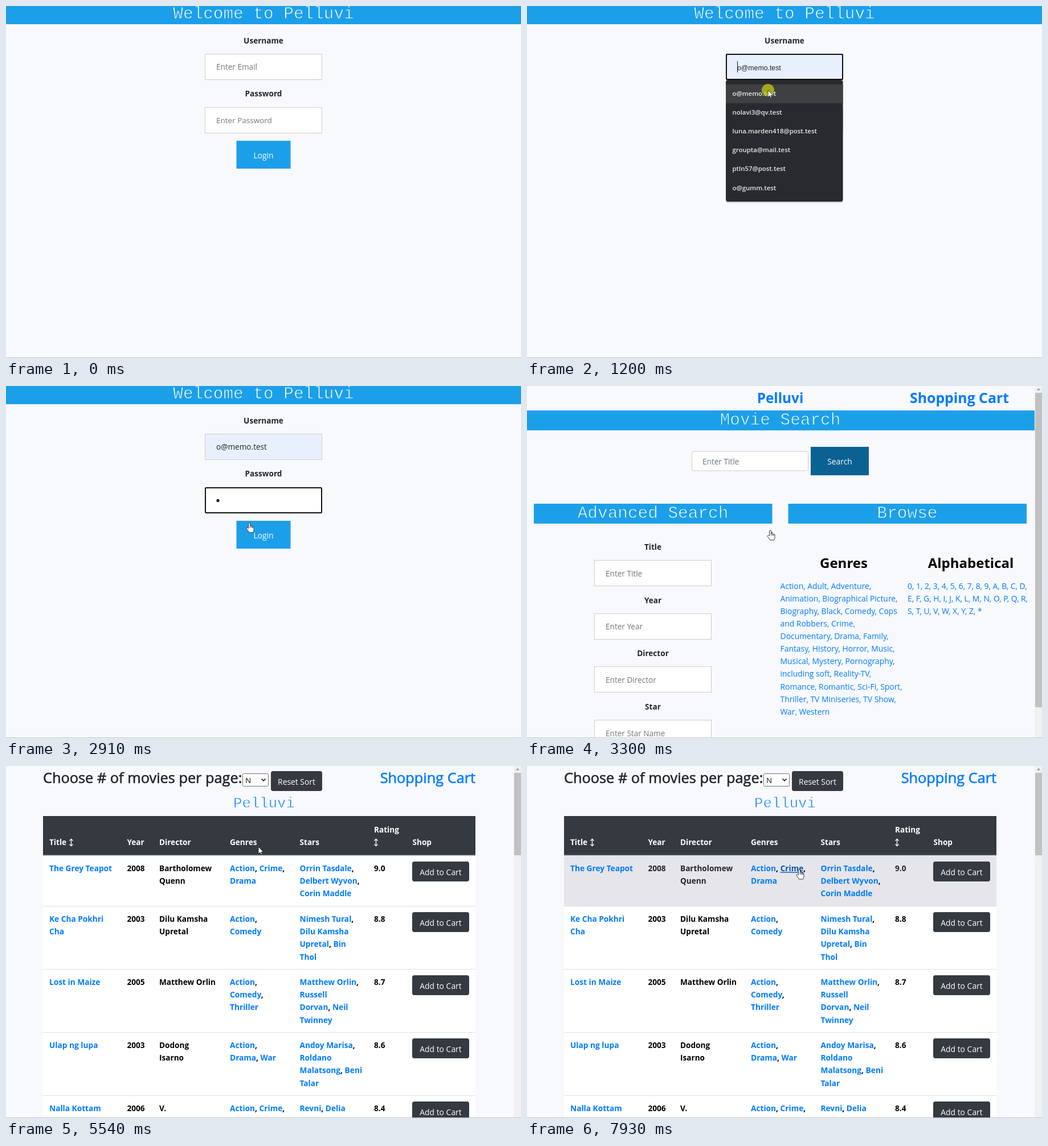
Animation of 904x619 px, one loop 8000 ms. Source, as an HTML page:

```html
<!DOCTYPE html>
<html lang="en">
<head>
<meta charset="utf-8">
<title>Movie shop walkthrough</title>
<style>
html, body { margin: 0; width: 100%; height: 100%; overflow: hidden; background: #f8f9fd; }
svg { display: block; width: 904px; height: 619px; font-family: "Open Sans", "Noto Sans", sans-serif; }
text { white-space: pre; }
.mono { font-family: "Liberation Mono", monospace; }
.arial { font-family: "Liberation Sans", sans-serif; }
.hover { fill: #0056b3; text-decoration: underline; }
</style>
</head>
<body>
<svg id="stage" viewBox="0 0 904 619"></svg>
<script>
const LOOP = 8000;
const BG = '#f8f9fd', BLUE = '#1c9fe9', LINK = '#007bff', DARK = '#343a40', INK = '#212529', HINT = '#757575';
const BRAND = 'Pelluvi', EMAIL = 'o@memo.test';

const attrs = o => Object.entries(o).map(([k, v]) => ` ${k}="${v}"`).join('');
const rect = (x, y, width, height, fill, more = {}) => `<rect${attrs({ x, y, width, height, fill, ...more })}/>`;
const text = (x, y, s, size = 13.8, fill = INK, more = {}) =>
  `<text${attrs({ x, y, 'font-size': size, fill, ...more })}>${s}</text>`;
const group = (id, ...parts) => `<g id="${id}">${parts.join('')}</g>`;
const mid = { 'text-anchor': 'middle' };
const bold = { 'font-weight': 700 };
const boldMid = { ...mid, ...bold };

// Medium weight: regular letters with a fine outline in their own colour.
const medium = (x, y, s, fill, more = {}) =>
  text(x, y, s, 25.3, fill, { stroke: fill, 'stroke-width': .6, ...more });
// Thin typewriter lettering: the outline eats into the fill.
const mono = (x, y, s, size, fill, back) =>
  text(x, y, s, size, fill, { ...mid, class: 'mono', stroke: back, 'stroke-width': size * .03 });
const bar = (x, y, w, h, s, cx, base) => rect(x, y, w, h, BLUE) + mono(cx, base, s, 29.4, '#fff', BLUE);
const box = (x, y, w, h, r = 0) =>
  rect(x + .5, y + .5, w - 1, h - 1, '#fff', { stroke: '#ccc', rx: r });
const focusBox = (id, y, h, fill) =>
  rect(350, y + 1, 204, h - 2, fill, { id, stroke: '#101010', 'stroke-width': 2, rx: 2 });
const button = (x, y, w, h, s, fill, r = 0) =>
  rect(x, y, w, h, fill, { rx: r }) + text(x + w / 2, y + h / 2 + 6, s, 13.9, '#fff', mid);
const lines = (x, y, list, fn) => list.map((s, i) => fn(x, y + i * 22.07, s)).join('');
const scrollbar = end => rect(891, 0, 13, 618, '#f1f1f1') + rect(892, 12, 12, end - 12, '#c1c1c1') +
  '<path d="M894.5 7.5h7l-3.5-4z" fill="#a3a3a3"/>';

function loginPage() {
  const mails = [EMAIL, 'nolavi3@qv.test', 'luna.marden418@post.test', 'groupta@mail.test', 'ptln57@post.test', 'o@gumm.test'];
  return group('login',
    bar(0, 0, 904, 32, 'Welcome to ' + BRAND, 452, 22),
    text(452, 66, 'Username', 13.6, INK, boldMid),
    box(349, 84, 206, 46),
    focusBox('userFocus', 84, 46, '#fff'),
    rect(350, 85, 204, 44, '#e8f0fe', { id: 'userFill' }),
    rect(350, 85, 204, 44, 'none', { id: 'userRing', stroke: '#101010', 'stroke-width': 2, rx: 2 }),
    text(369, 112, 'Enter Email', 13.6, HINT, { id: 'userHint' }),
    text(369, 112.5, EMAIL, 12.3, '#222', { id: 'preview', class: 'arial' }),
    text(369, 112, EMAIL, 13.6, INK, { id: 'userText' }),
    text(452, 159, 'Password', 13.6, INK, boldMid),
    box(349, 178, 206, 46),
    focusBox('passFocus', 178, 46, '#fff'),
    text(369, 206, 'Enter Password', 13.5, HINT, { id: 'passHint' }),
    '<circle id="dot" cx="372" cy="201.5" r="2.7" fill="#212529"/>',
    rect(369, 0, 1, 20, '#111', { id: 'caret' }),
    button(404.5, 237, 95, 49, 'Login', BLUE),
    group('menu',
      rect(349, 131, 206, 215, '#000', { rx: 4, opacity: .18 }),
      rect(349, 130, 205.5, 214, '#292a2d', { rx: 4 }),
      rect(349, 138, 205.5, 33, '#3f4042', { id: 'menuHover' }),
      ...mails.map((s, i) => text(360.5, 158 + i * 33.1, s, 11.4, '#e8eaed', { 'font-weight': 600 }))));
}

function searchPage() {
  const genres = [', Adult, Adventure,', 'Animation, Biographical Picture,', 'Biography, Black, Comedy, Cops',
    'and Robbers, Crime,', 'Documentary, Drama, Family,', 'Fantasy, History, Horror, Music,',
    'Musical, Mystery, Pornography,', 'including soft, Reality-TV,', 'Romance, Romantic, Sci-Fi, Sport,',
    'Thriller, TV Miniseries, TV Show,', 'War, Western'];
  genres[0] = '<tspan id="action">Action</tspan>' + genres[0];
  const letters = ['0123456789ABCD', 'EFGHIJKLMNOPQR', 'STUVWXYZ*']
    .map((s, i) => [...s].join(', ') + (i < 2 ? ',' : ''));
  const link = (x, y, s) => text(x, y, s, 13.9, LINK);
  const fields = [['Title', 'Title'], ['Year', 'Year'], ['Director', 'Director'], ['Star', 'Star Name']];
  return group('search',
    text(444.5, 30, BRAND, 24.3, LINK, boldMid),
    text(759, 30, 'Shopping Cart', 24.8, LINK, boldMid),
    bar(0, 43, 891, 35, 'Movie Search', 444.5, 68),
    box(289, 114.5, 205, 35, 3.5),
    text(308, 138, 'Enter Title', 13.6, '#6c757d'),
    button(498, 107, 102, 50, 'Search', '#0a6292'),
    bar(12, 207, 418.5, 35, 'Advanced Search', 221, 232),
    bar(458.5, 207, 418.5, 35, 'Browse', 667.5, 232),
    ...fields.map(([name, hint], i) => {
      const y = 306 + i * 93.7;
      return text(221, y - 18, name, 13.6, INK, boldMid) + box(118, Math.round(y), 206, 46) +
        text(138, y + 28.5, 'Enter ' + hint, 13.6, HINT);
    }),
    text(556, 320, 'Genres', 24, '#000', boldMid),
    text(779, 320, 'Alphabetical', 24, '#000', boldMid),
    lines(444.5, 357, genres, link),
    lines(668, 357, letters, link),
    scrollbar(565));
}

const chevron = x => `<path d="M${x - 3.5} 22.5l3.5 3.5 3.5-3.5" fill="none" stroke="#111" stroke-width="1.6"/>`;
const upDown = (x, y) =>
  `<path d="M${x} ${y - 6}v12m-3-9l3-3 3 3m-6 6l3 3 3-3" fill="none" stroke="#fff" stroke-width="1.3"/>`;
const picker = (x, w) => rect(x + .5, 13.5, w - 1, 22, '#fff', { stroke: '#767676', rx: 2 });
const head = (x, y, s) => text(x, y, s, 13.6, '#fff', bold);

// Heading, page size picker and cart link, shared by both result pages.
const toolbar = (left, right, pickX, pickW, resetX, cx) =>
  medium(left, 30, 'Choose # of movies per page:', INK) +
  picker(pickX, pickW) + button(resetX, 9, 90, 35, 'Reset Sort', DARK, 3.7) +
  medium(right, 30, 'Shopping Cart', LINK, { 'text-anchor': 'end' }) +
  mono(cx, 73, BRAND, 25.7, LINK, BG);

function emptyPage() {
  const cols = { Year: 124.5, Director: 236, Genres: 405.5, Stars: 556, Shop: 725 };
  return group('empty',
    toolbar(66, 838, 416, 23, 442, 460.5), chevron(429),
    rect(66, 88, 772, 47, DARK), rect(66, 133, 772, 2, '#454d55'),
    ...Object.entries(cols).map(([s, x]) => head(x, 117, s)));
}

function listPage() {
  const cols = { Title: 76, Year: 212.5, Director: 269, Genres: 393, Stars: 515.5, Shop: 713.5 };
  const films = [
    [157, 'The Grey Teapot', 2008, 'Bartholomew|Quenn', 'Action, Crime,|Drama', 'Orrin Tasdale,|Delbert Wyvon,|Corin Maddle', '9.0'],
    [246, 'Ke Cha Pokhri|Cha', 2003, 'Dilu Kamsha|Upretal', 'Action,|Comedy', 'Nimesh Tural,|Dilu Kamsha|Upretal, Bin|Thol', '8.8'],
    [357, 'Lost in Maize', 2005, 'Matthew Orlin', 'Action,|Comedy,|Thriller', 'Matthew Orlin,|Russell|Dorvan, Neil|Twinney', '8.7'],
    [468, 'Ulap ng lupa', 2003, 'Dodong|Isarno', 'Action,|Drama, War', 'Andoy Marisa,|Roldano|Malatsong, Beni|Talar', '8.6'],
    [579, 'Nalla Kottam', 2006, 'V.', 'Action, Crime,', 'Revni, Delia', '8.4']
  ];
  const plain = (x, y, s) => text(x, y, s, 13.6, 'inherit', bold);
  const link = (x, y, s) => text(x, y, s.replace(/,/g, '<tspan fill="#000">,</tspan>'), 13.7, LINK, bold);
  const row = ([y, title, year, director, genres, stars, rating], i) => {
    const cell = (x, s, fn) => lines(x, y + 28.3, String(s).split('|'), fn);
    const parts = [cell(cols.Title, title, link), cell(cols.Genres, genres, link)];
    if (!i) {
      parts[0] = parts[0].replace(title, `<tspan id="film">${title}</tspan>`);
      parts[1] = parts[1].replace('Crime', '<tspan id="crime">Crime</tspan>');
    }
    return rect(65, y, 759, 112, '#fff') +
      (i ? '' : rect(65, y, 759, 89, '#e6e5ea', { id: 'rowHover' })) +
      rect(65, y, 759, 1, '#dee2e6') + parts.join('') +
      `<g${i ? '' : ' id="rowText"'} fill="#000">` + cell(cols.Year, year, plain) +
      cell(cols.Director, director, plain) + cell(646, rating, plain) + '</g>' +
      cell(cols.Stars, stars, link) + button(713, Math.round(y + 11.4), 100, 35, 'Add to Cart', DARK, 3.7);
  };
  return group('list',
    toolbar(65, 824, 415, 46, 465, 453), text(420, 30, 'N', 13.5, '#111'), chevron(452),
    ...films.map(row),
    rect(65, 88, 759, 69, DARK), rect(65, 155, 759, 2, '#454d55'),
    ...Object.entries(cols).map(([s, x]) => head(x, 139, s)),
    upDown(114.5, 134.5), head(646, 117, 'Rating'), upDown(649.5, 134.5),
    scrollbar(157));
}

const pointer = group('pointer',
  '<circle id="press" r="11" fill="#c8c814" opacity=".75"/>',
  '<path id="arrow" d="M0 0V12.5L2.9 9.8 4.8 14 6.7 13.2 4.9 9.1H8.8Z" fill="#fff" stroke="#111" stroke-width=".8"/>',
  '<path id="beam" d="M-2.5-6Q0-6 0-4.5 0-6 2.5-6M-2.5 6Q0 6 0 4.5 0 6 2.5 6M0-5V5" fill="none" stroke="#111"/>',
  '<path id="hand" d="M-1.5 9.5V1.2Q-1.5 0 0 0T1.5 1.2V6Q3 0 4 6.2 5.5 5.6 6 7 8 6.3 8 8.2V12Q8 14.5 6.5 17H-.5Q-2 14-4.5 11.2C-6 9.3-4 8-2.8 9.2Z' +
  'M1.5 6V9M4 6.2V9M6 7V9.4" fill="#fff" stroke="#222" stroke-width=".9" stroke-linejoin="round"/>');

const stage = document.getElementById('stage');
stage.innerHTML = rect(0, 0, 904, 619, BG) + loginPage() + searchPage() + emptyPage() + listPage() +
  rect(0, 618, 904, 1, '#c4c5c9') + pointer;
const el = {};
stage.querySelectorAll('[id]').forEach(n => el[n.id] = n);

const show = (id, on) => el[id].style.display = on ? '' : 'none';
const within = (t, a, b) => t >= a && t < b;

// Pointer moves: first step, last step, number of steps, goal.
const moves = [
  [200, 890, 10, 423, 107], [1050, 1200, 3, 423, 148], [1280, 1760, 6, 428, 187],
  [2600, 3060, 7, 427, 254], [3770, 4080, 5, 471, 345], [4470, 4990, 7, 441, 208],
  [5070, 5380, 5, 443, 142], [5790, 6310, 8, 128, 182], [7870, 7930, 2, 478, 182]
];
const presses = [[970, 1120], [1200, 1280], [1990, 2070], [3060, 3140], [4230, 4390]];

function pointerAt(t) {
  let x = 806, y = 604;
  for (const [a, b, n, gx, gy] of moves) {
    if (t < a) break;
    const k = Math.min(n, Math.floor((t - a) / (b - a) * (n - 1) + 1e-6) + 1) / n;
    const p = k * k * (3 - 2 * k);
    x += (gx - x) * p;
    y += (gy - y) * p;
  }
  return [x, y];
}

function pointerKind(t, x, y, menu) {
  if (t < 3300) {
    const inX = x > 349 && x < 555;
    if (inX && (within(y, 84, 130) || !menu && within(y, 178, 224))) return 'beam';
    return x > 404 && x < 500 && within(y, 237, 286) && !menu ? 'hand' : 'arrow';
  }
  if (t < 4470) return within(t, 3770, 4080) ? 'arrow' : 'hand';
  return within(t, 6310, 7870) || t >= 7930 ? 'hand' : 'arrow';
}

function draw(t) {
  show('login', t < 3300);
  show('search', within(t, 3300, 4390));
  show('empty', within(t, 4390, 5540));
  show('list', t >= 5540);

  const menu = within(t, 970, 1280), hovered = within(t, 1120, 1280), filled = t >= 1280;
  const userFocus = within(t, 970, 1990), passFocus = within(t, 1990, 3060);
  show('menu', menu);
  show('menuHover', hovered);
  show('userFocus', userFocus);
  show('userFill', hovered || filled);
  show('userRing', userFocus);
  show('userHint', !hovered && !filled);
  show('preview', hovered);
  show('userText', filled);
  show('passFocus', passFocus);
  show('passHint', t < 2430);
  show('dot', t >= 2430);
  show('caret', menu || within(t, 1990, 2430));
  el.caret.setAttribute('y', menu ? 97 : 191);

  const [x, y] = pointerAt(t);
  const inRow = t >= 5540 && y >= 157;
  el.action.classList.toggle('hover', t >= 4080);
  el.film.classList.toggle('hover', within(t, 6310, 7870));
  el.crime.classList.toggle('hover', t >= 7930);
  show('rowHover', inRow);
  el.rowText.setAttribute('fill', inRow ? INK : '#000');

  const kind = pointerKind(t, x, y, menu);
  show('pointer', t >= 200);
  el.pointer.setAttribute('transform', `translate(${x.toFixed(1)} ${y.toFixed(1)})`);
  for (const k of ['arrow', 'beam', 'hand']) show(k, k === kind);
  show('press', presses.some(([a, b]) => within(t, a, b)));
}

const start = performance.now();
function tick() {
  draw((performance.now() - start) % LOOP);
  requestAnimationFrame(tick);
}
tick();
</script>
</body>
</html>
```
